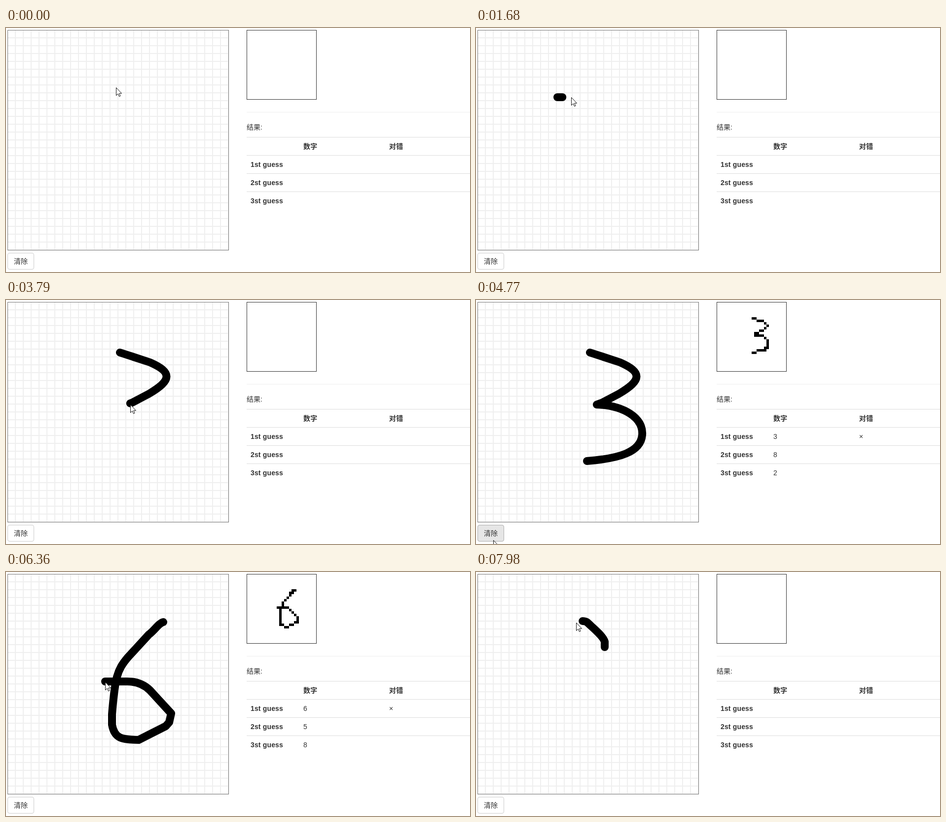
An HTML page that plays this animation: 941 px wide and 497 px high, repeating every 8000 ms.

```html
<!DOCTYPE html>
<html lang="zh-CN">
<head>
<meta charset="utf-8">
<style>
  html, body { margin: 0; width: 100%; height: 100%; overflow: hidden; background: #fff; }
  svg { display: block; }
  text { font: 14px "Liberation Sans", "Noto Sans CJK SC", sans-serif; fill: #333; }
  .bold text { font-weight: bold; letter-spacing: .15px; }
</style>
</head>
<body>
<svg width="941" height="497" viewBox="0 0 941 497">
  <defs>
    <pattern id="grid" x="2" y="3" width="16" height="16" patternUnits="userSpaceOnUse">
      <path d="M0 0H16V2H2V16H0Z" fill="#efefef"/>
    </pattern>
  </defs>
  <rect x="4" y="5" width="447" height="447" fill="url(#grid)"/>
  <rect x="3.5" y="4.5" width="448" height="448" fill="none" stroke="#777"/>
  <g id="ink" fill="none" stroke="#000" stroke-width="16" stroke-linecap="round" stroke-linejoin="round"></g>

  <rect x="488.5" y="4.5" width="141" height="141" fill="none" stroke="#333"/>
  <path id="thumb" shape-rendering="crispEdges"/>
  <path d="M488 171.5H941" stroke="#eee"/>
  <path d="M488 222.5H941M488 259.5H941M488 296.5H941M488 333.5H941" stroke="#ddd"/>
  <text x="488" y="207">结果:</text>
  <g class="bold">
    <text x="603" y="246">数字</text>
    <text x="777" y="246">对错</text>
    <text x="496" y="283">1st guess</text>
    <text x="496" y="320">2st guess</text>
    <text x="496" y="357">3st guess</text>
  </g>
  <g id="guesses">
    <text x="603" y="283"></text>
    <text x="603" y="320"></text>
    <text x="603" y="357"></text>
    <text x="777" y="283"></text>
  </g>

  <rect id="button" x="3.5" y="458.5" width="53" height="33" rx="3.5"/>
  <rect id="ring" x="3.5" y="458.5" width="53" height="33" rx="3" fill="none" stroke="#6ea3f2" stroke-width="3"/>
  <text x="16" y="480">清除</text>
  <path id="cursor" d="M.5 .5V16.5L4.2 13 6.5 18.5 9 17.5 6.7 12.2H11.5Z" fill="#fff" stroke="#111"/>
</svg>
<script>
const LOOP = 8000, STEP = 76.9, CELL = 16;
const BUTTON = { x: 34, y: 478 }, BELOW = { x: 36, y: 500 };
const $ = id => document.getElementById(id);

// Stroke from start to end, pointer below the button at park, then click and clear.
const digits = [
  { start: 70, end: 420, park: 920, click: 1280, clear: 1450, guesses: '174',
    stroke: 'M223 121L218 325' },
  { start: 1680, end: 2200, park: 2680, click: 3060, clear: 3140, guesses: '237',
    stroke: 'M165 141H192C225 145 255 148 255 181C255 206 215 234 181 263L163 271 142 285 143 289H180L208 287 270 286 321 283' },
  { start: 3480, end: 4140, park: 4600, click: 4840, clear: 4915, guesses: '382',
    stroke: 'M231 107L292 127C337 147 337 163 290 191L256 209 245 213C300 215 340 240 337 275S290 323 225 328' },
  { start: 5500, end: 6310, park: 7070, click: 7455, clear: 7600, guesses: '658',
    stroke: 'M319 102C310 104 300 120 290 127L247 174C225 200 221 215 215 290V311C220 340 235 341 269 342L324 314 331 306 335 288 292 241C278 227 262 223 246 223H201' },
  { start: 7890, end: 8055, clear: Infinity,
    stroke: 'M261 153V142C258 130 235 112 226 103Q221 98 206 101L180 115' }
];

const progress = (t, from, to) => Math.min(1, Math.max(0, (t - from) / (to - from)));
const smooth = k => k * k * (3 - 2 * k);
const mix = (a, b, k) => ({ x: a.x + (b.x - a.x) * k, y: a.y + (b.y - a.y) * k });
const drawn = (d, t) => d.length * progress(t, d.start, d.end);

// Cells of the 28x28 miniature that the stroke passes through for long enough.
function miniature(path, length) {
  const hits = {};
  for (let s = 0; s <= length; s++) {
    const p = path.getPointAtLength(s);
    const key = Math.floor((p.x - 3) / CELL) + ',' + Math.floor((p.y - 4) / CELL);
    hits[key] = (hits[key] || 0) + 1;
  }
  return Object.keys(hits).filter(key => hits[key] > 7).map(key => {
    const [x, y] = key.split(',');
    return `M${489 + x * 5} ${5 + y * 5}h5v5h-5z`;
  }).join('');
}

for (const d of digits) {
  d.path = document.createElementNS('http://www.w3.org/2000/svg', 'path');
  d.path.setAttribute('d', d.stroke);
  $('ink').append(d.path);
  d.length = d.path.getTotalLength();
  d.cells = miniature(d.path, d.length);
}

// Button to stroke, along the stroke a little ahead of the ink, then back to the button.
function pointer(t) {
  const i = digits.findIndex(d => t < d.clear), d = digits[i];
  const tip = d.path.getPointAtLength(drawn(d, t + 20));
  if (t < d.start) return i ? mix(BUTTON, d.path.getPointAtLength(0), smooth(progress(t, digits[i - 1].clear, d.start))) : tip;
  if (t < d.end) return tip;
  if (t < d.park) return mix(tip, BELOW, smooth(progress(t, d.end + 50, d.park)));
  return mix(BELOW, BUTTON, progress(t, d.park, d.click) ** 2);
}

function render(t) {
  let shown = null, focused = false;
  digits.forEach((d, i) => {
    const visible = t >= d.start && t < d.clear;
    d.path.style.display = visible ? '' : 'none';
    d.path.setAttribute('stroke-dasharray', `${drawn(d, t)} 9999`);
    if (visible && d.guesses && t >= d.end + 20) shown = d;
    if (t >= d.click && t < digits[i + 1].start) focused = true;
  });

  $('thumb').setAttribute('d', shown ? shown.cells : '');
  const labels = shown ? [...shown.guesses, '×'] : [];
  [...$('guesses').children].forEach((el, i) => el.textContent = labels[i] || '');

  const { x, y } = pointer(t);
  $('cursor').setAttribute('transform', `translate(${Math.round(x)} ${Math.round(y)})`);
  const active = focused || (x >= 3 && x < 57 && y >= 458 && y < 490);
  $('button').setAttribute('fill', active ? '#e6e6e6' : '#fff');
  $('button').setAttribute('stroke', active ? '#adadad' : '#ccc');
  $('ring').style.display = focused ? '' : 'none';
}

// Motion advances about 13 times a second, like a screen recording.
function tick() {
  const t = performance.now() % LOOP;
  render(Math.floor(t / STEP + .45) * STEP);
  requestAnimationFrame(tick);
}
tick();
</script>
</body>
</html>
```
